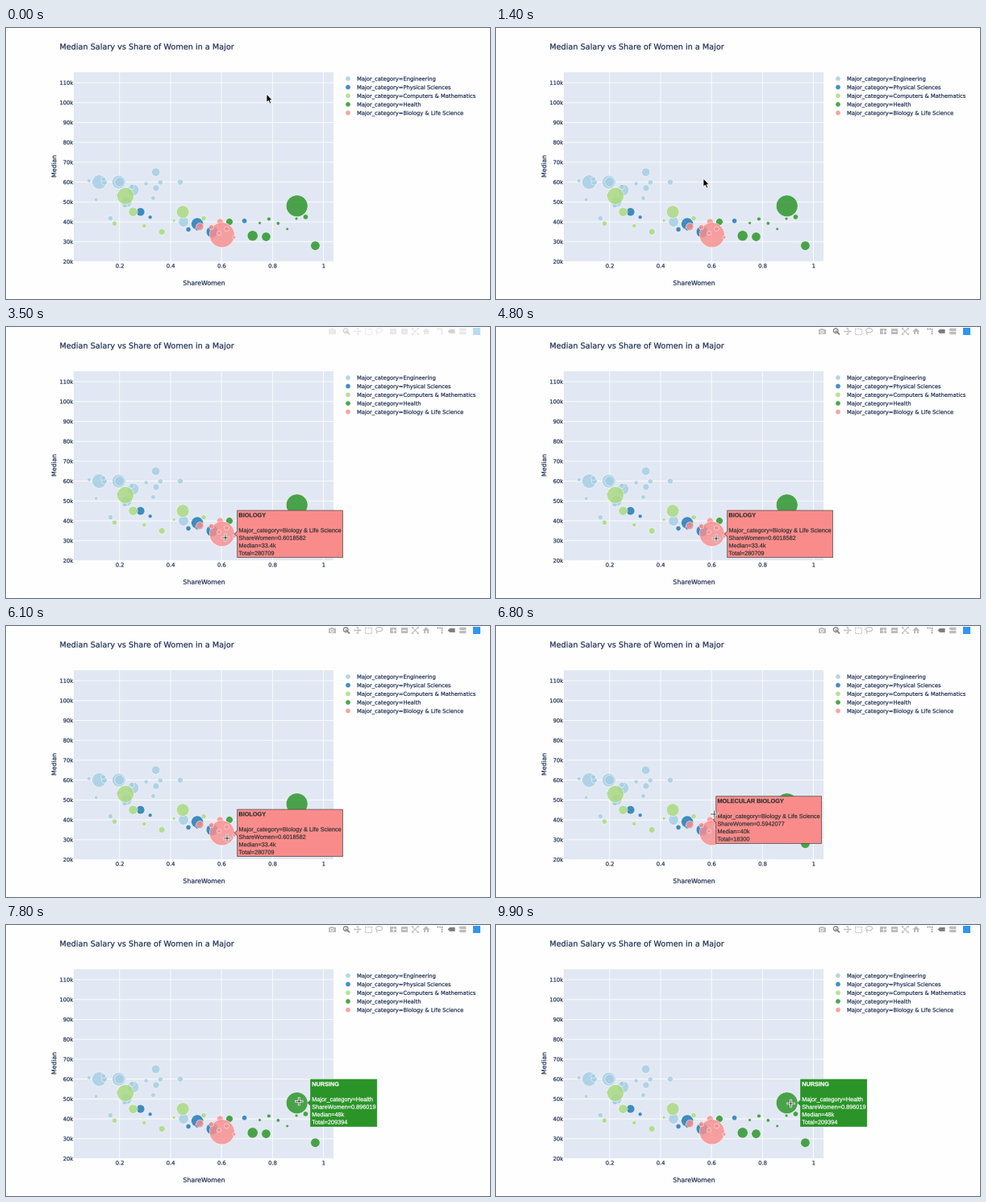
Animation, 600 px wide and 337 px high, one loop 10000 ms. Source, as a matplotlib script:

```python
import matplotlib.pyplot as plt
import numpy as np
from matplotlib.animation import FuncAnimation
from matplotlib.patches import Circle, Ellipse, PathPatch, Polygon, Rectangle
from matplotlib.path import Path
from matplotlib.textpath import TextPath
from matplotlib.transforms import Affine2D

W, H, DPI = 600, 337, 100
FRAMES, STEP = 100, 100
PT = 72 / DPI                     # points per pixel

INK = "#1c2d52"
PAPER = "#e1e8f3"
GREY, DARK = "#bcbcbc", "#7d7d7d"
LEFT, TOP, RIGHT, BOTTOM = 84, 54.5, 406.3, 290.5

fig = plt.figure(figsize=(W / DPI, H / DPI), dpi=DPI, facecolor="#fefefe")
ax = fig.add_axes([0, 0, 1, 1])
ax.set_xlim(0, W)
ax.set_ylim(H, 0)
ax.axis("off")
rng = np.random.default_rng(4)


def px(share):
    return 140.8 + (share - 0.2) * 315.9


def py(median):
    return BOTTOM - (median - 20) * 2.472


def radius(total):
    return 15.5 * np.sqrt(total / 280.7)


def add(artist, z):
    artist.set_zorder(z)
    return ax.add_artist(artist)


def label(x, y, text, size, color=INK, align=0.0, turn=0, z=5,
          family="DejaVu Sans", weight="normal"):
    """Text with its baseline at y; align 0, 0.5 or 1 sets the anchor."""
    path = TextPath((0, 0), text, size=size,
                    prop={"family": family, "weight": weight})
    shift = -align * path.get_extents().x1
    place = Affine2D().translate(shift, 0).rotate_deg(turn).scale(1, -1).translate(x, y)
    return add(PathPatch(place.transform_path(path), fc=color, ec=color,
                         lw=0.2 * PT), z)


def line(xs, ys, color, width, z, **kw):
    artist, = ax.plot(xs, ys, color=color, lw=width * PT, zorder=z, **kw)
    return artist


def bubble(x, y, r, color, z):
    add(Circle((x, y), r, fc=color, ec="white", lw=0.55 * PT, alpha=0.83), z)


# ---- plot area -------------------------------------------------------------
add(Rectangle((LEFT, TOP), RIGHT - LEFT, BOTTOM - TOP, fc=PAPER, lw=0), 0)
for share in np.arange(1, 6) / 5:
    line([px(share)] * 2, [TOP, BOTTOM], "white", 0.9, 1, snap=False)
    label(px(share), 298.2, f"{share:g}", 6.72, align=0.5)
for median in range(20, 111, 10):
    line([LEFT, RIGHT], [py(median)] * 2, "white", 0.9, 1, snap=False)
    label(83.2, py(median) + 2.5, f"{median}k", 6.72, align=1)

label(66.4, 26.6, "Median Salary vs Share of Women in a Major", 9.68)
label(245.2, 319.8, "ShareWomen", 7.85, align=0.5)
label(62.2, 172.3, "Median", 7.7, align=0.5, turn=90)

# ---- bubbles: share of women, median and total in thousands ----------------
BIO = (.6018582, 33.4, 280.709)
MOLECULAR = (.5942077, 40, 18.3)
NURSE = (.896019, 48, 209.394)

# name, colour, main bubbles, then count and ranges of the small ones
groups = [
    ("Engineering", "#a6cee3",
     [(.12, 60, 91), (.197, 60, 82), (.2, 60, 42), (.14, 60, 15), (.438, 60, 15),
      (.342, 65, 32), (.343, 57, 19), (.253, 56, 61), (.227, 50, 53), (.451, 40, 46)],
     11, (.08, .36), (40, 62)),
    ("Physical Sciences", "#1f78b4",
     [(.282, 45, 32), (.505, 39, 66), (.47, 36.2, 11), (.563, 35, 62)],
     3, (.32, .69), (35, 46)),
    ("Computers & Mathematics", "#aada80",
     [(.223, 53, 128), (.253, 45, 37), (.448, 45, 72), (.366, 35, 18)],
     4, (.18, .53), (36, 45)),
    ("Health", "#2a9428",
     [NURSE, (.631, 40, 22), (.722, 33, 50), (.775, 32.5, 37), (.968, 28, 38)],
     6, (.75, .93), (34, 45)),
    ("Biology & Life Science", "#f98f90",
     [MOLECULAR, (.515, 37.5, 26), BIO],
     4, (.56, .65), (32, 38)),
]
for row, (name, color, main, count, shares, medians) in enumerate(groups):
    small = zip(np.linspace(*shares, count), rng.uniform(*medians, count),
                rng.uniform(2, 12, count))
    for share, median, total in [*main, *small]:
        bubble(px(share), py(median), radius(total), color, 2 + row / 10)
    y = 63 + 10.65 * row
    bubble(424, y, 3.1, color, 2)
    label(435, y + 2.5, "Major_category=" + name, 6.73)


# ---- hover boxes -----------------------------------------------------------
def hover(point, title, group, width, fill, ink, edge):
    share, median, total = point
    x, y = px(share) + radius(total), py(median)
    x0, x1, y0, y1 = x + 3.5, x + 3.5 + width, y - 29.3, y + 29.3
    corners = [(x, y), (x0, y - 3.4), (x0, y0), (x1, y0),
               (x1, y1), (x0, y1), (x0, y + 3.4)]
    parts = [add(Polygon(corners, fc=fill, ec=edge, lw=0.7 * PT), 6)]
    rows = [title, "", f"Major_category={group}", f"ShareWomen={share:.7g}",
            f"Median={median:g}k", f"Total={total * 1000:.0f}"]
    for i, text in enumerate(rows):
        if text:
            parts.append(label(x0 + 1.7, y - 21 + 9.46 * i, text, 7.3, ink, z=7,
                               family="Liberation Sans",
                               weight="normal" if i else "bold"))
    return parts


PINK = ("Biology & Life Science", 130.7, "#f98c8b", "#333333", "#444444")
GREEN = ("Health", 82.2, "#2a9428", "white", "#2a9428")
boxes = [                         # start and end in seconds
    (3.4, 6.5, hover(BIO, "BIOLOGY", *PINK)),
    (6.5, 7.0, hover(MOLECULAR, "MOLECULAR BIOLOGY", *PINK)),
    (7.4, 10.0, hover(NURSE, "NURSING", *GREEN)),
]

# ---- toolbar ---------------------------------------------------------------
MID = 5.4
bar = []


def stroke(points, color=GREY, width=1.0, **kw):
    xs, ys = zip(*points)
    bar.append(line(xs, ys, color, width, 8, solid_capstyle="butt", **kw))


def solid(points, color=GREY):
    bar.append(add(Polygon(points, fc=color, lw=0), 8))


def block(x, y, w, h, color=GREY):
    """Rectangle centred on x, y."""
    bar.append(add(Rectangle((x - w / 2, y - h / 2), w, h, fc=color, lw=0), 8))


def ring(x, y, w, h, color=GREY, width=1.0):
    bar.append(add(Ellipse((x, y), w, h, fc="none", ec=color, lw=width * PT), 8))


def sign(x, y, arm, color, width, upright=True):
    stroke([(x - arm, y), (x + arm, y)], color, width)
    if upright:
        stroke([(x, y - arm), (x, y + arm)], color, width)


def tag(x, y, w, h, color=GREY):
    solid([(x, y), (x + h / 2, y - h / 2), (x + w, y - h / 2),
           (x + w, y + h / 2), (x + h / 2, y + h / 2)], color)


# camera
block(404, 6, 9, 6.4)
block(404, 2.3, 4, 1.6)
ring(404, 6, 3.6, 3.6, "white", 0.9)
# magnifier
ring(421.2, 4.6, 5.6, 5.6, DARK, 1.3)
stroke([(423.2, 6.6), (426, 9.4)], DARK, 1.7)
sign(421.2, 4.6, 1.5, DARK, 0.8)
# four-way arrow
sign(435.5, MID, 4, GREY, 1)
for angle in range(0, 360, 90):
    turn = Affine2D().rotate_deg(angle).translate(435.5, MID)
    solid(turn.transform([(4.6, 0), (2.8, 1.6), (2.8, -1.6)]))
# dashed box and lasso
stroke([(445, 1.5), (453, 1.5), (453, 9.3), (445, 9.3), (445, 1.5)],
       width=1.1, dashes=(1.5, 0.9))
ring(462.6, 4.2, 8, 5.2)
stroke([(460, 6.3), (459.2, 7.8), (460.6, 9.6)])
# plus and minus
for x, upright in ((480.2, True), (493.7, False)):
    block(x, MID, 7.8, 7.8)
    sign(x, MID, 2.3, "white", 1.1, upright)
# autoscale
for sx in (-1, 1):
    for sy in (-1, 1):
        x, y = 507.2 + 4 * sx, MID + 4 * sy
        stroke([(x - 2 * sx, y), (x, y), (x, y - 2 * sy)], width=0.8)
        stroke([(507.2, MID), (x, y)])
# home
solid([(516.2, 5.6), (520.8, 1.2), (525.4, 5.6)])
block(520.8, 7.2, 6.4, 4.3)
block(520.8, 7.9, 1.7, 2.9, "white")
# spike lines
stroke([(533.6, 2.2), (540, 2.2), (540, 9)], DARK, 1.2, dashes=(1.4, 0.9))
# tags
tag(547.6, MID, 9, 5, DARK)
for y in (3.3, 7.5):
    tag(561.4, y, 9, 3.4)
# badge
block(583.5, MID, 9, 9, "#2f95f0")

# ---- pointer ---------------------------------------------------------------
arrow = add(Polygon([(0, 0), (0, 10.6), (2.4, 8.4), (4.1, 12.2), (5.8, 11.5),
                     (4.2, 7.8), (7.4, 7.8)],
                    fc="black", ec="white", lw=0.8 * PT, snap=False), 10)


def plus(arm, color, width, z):
    path = Path([(-arm, 0), (arm, 0), (0, -arm), (0, arm)],
                [Path.MOVETO, Path.LINETO] * 2)
    return add(PathPatch(path, fc="none", ec=color, lw=width * PT,
                         capstyle="butt", snap=False), z)


cross = [plus(5.2, "white", 2.6, 10), plus(4.6, "#404040", 0.9, 11)]

# seconds, x, y
route = np.array([
    (0, 323, 82), (1.4, 257, 187), (2.7, 271, 261), (3.5, 272, 262),
    (6.1, 274, 264), (6.8, 270.5, 234), (7.6, 363, 219), (9.9, 365.5, 222),
])
WAKE = 3.4                        # the chart starts to react to the pointer


def draw(frame):
    t = frame * STEP / 1000
    x, y = (np.interp(t, route[:, 0], route[:, k]) for k in (1, 2))
    place = Affine2D().translate(x, y) + ax.transData
    awake = t >= WAKE
    for part in (arrow, *cross):
        part.set_transform(place)
        part.set_visible(awake == (part is not arrow))
    for start, end, parts in boxes:
        for part in parts:
            part.set_visible(start <= t < end)
    fade = float(np.clip((t - WAKE) / 0.3, 0, 1))
    for part in bar:
        part.set_alpha(fade)
    return []


anim = FuncAnimation(fig, draw, frames=FRAMES, interval=STEP, repeat=True,
                     repeat_delay=0, blit=False)
plt.show()
```
